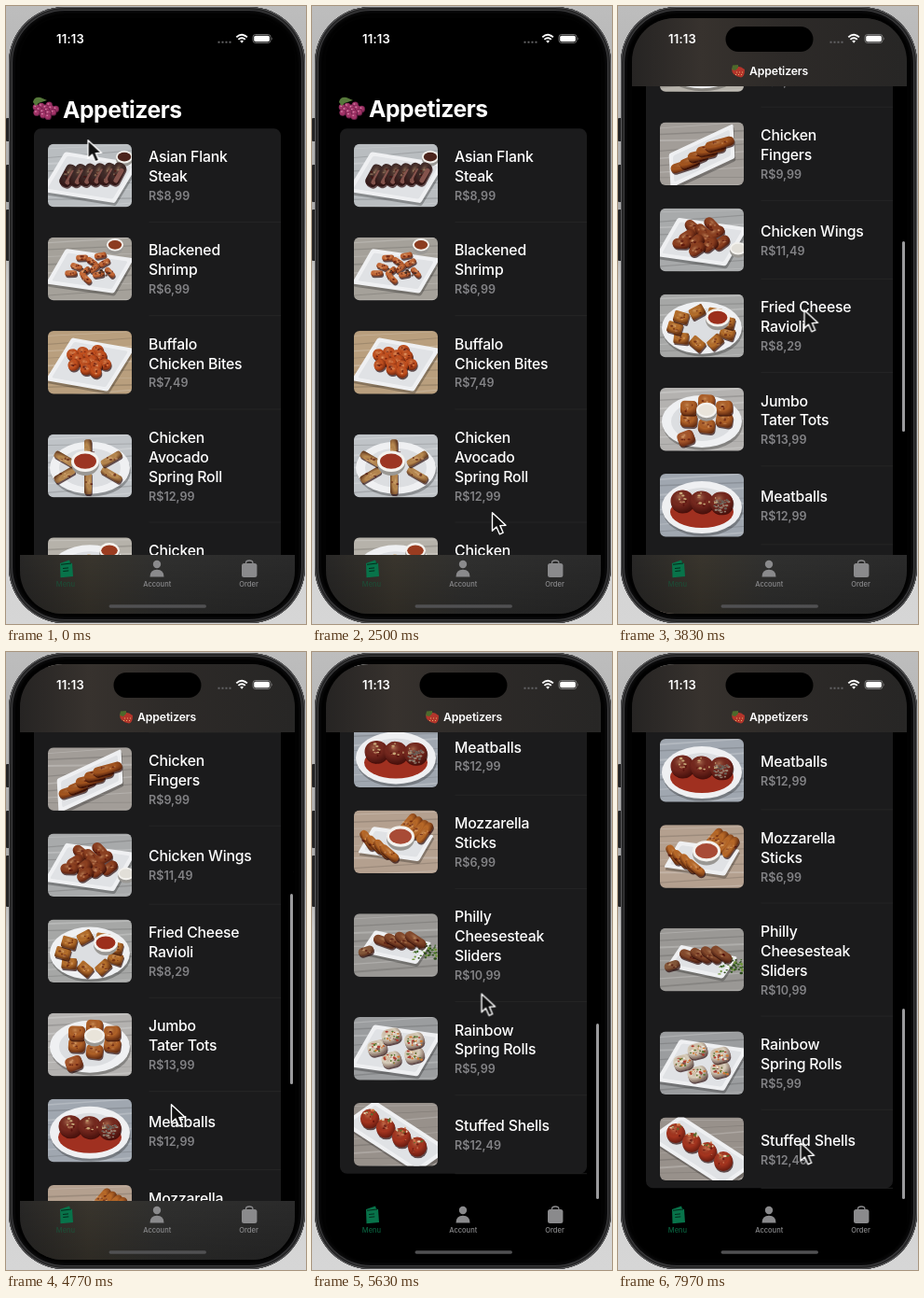
An HTML page that plays this animation: 322 px wide and 662 px high, repeating every 8 s.

```html
<!DOCTYPE html>
<html lang="en">
<head>
<meta charset="utf-8">
<title>Appetizers</title>
<style>
@property --s { syntax: '<number>'; inherits: true; initial-value: 0; }
html, body { margin: 0; width: 100%; height: 100%; overflow: hidden; }
body { position: relative; background: linear-gradient(#bdbdbd, #a9a9a9 35%, #c9c9c9 45%, #d6d6d6); }
svg { position: absolute; left: 0; top: 0; overflow: visible; }
text { font-family: Inter, Roboto, sans-serif; fill: #fff; }
.phone {
  position: absolute; left: 3px; top: 1px; width: 318px; height: 660px; border-radius: 60px;
  background: #020202;
  box-shadow: inset 0 0 0 1px #59595b, inset 0 0 0 3px #252526, inset 0 0 0 4px #3b3b3d, inset 0 0 3px 6px #0d0d0e;
}
.key { position: absolute; left: 0; width: 4px; background: #232324; border-radius: 1px; }
.screen {
  --top: clamp(0, (var(--s) - 30) / 16, 1);
  --end: clamp(0, (953 - var(--s)) / 14, 1);
  --over: max(0, var(--s) - 953);
  position: absolute; left: 0; top: 0; width: 322px; height: 662px; background: #000;
  clip-path: inset(13px 12px 11px 15px round 46px);
  animation: scroll 8s infinite;
}
.list { transform: translateY(calc(var(--s) * -1px)); }
.glass { position: absolute; left: 15px; width: 295px; }
.nav {
  top: 13px; height: 73px; opacity: var(--top);
  background: linear-gradient(90deg, #262423, #37322e 25%, #2d2a28 55%, #272625);
}
.tab {
  top: 588px; height: 64px; opacity: var(--end);
  background: linear-gradient(#0000, #0003), linear-gradient(90deg, #282726, #39352d 25%, #30302f 50%, #2a2a2a);
}
.bar { opacity: var(--top); }
.thumb {
  position: absolute; left: 305px; width: 2.6px; border-radius: 2px; background: #9b9b9d;
  top: calc(78.5px + min(var(--s), 953) * .3185px + var(--over) * 1px);
  height: calc(204px - var(--over) * 1px);
  opacity: clamp(0, var(--s) / 6, 1);
}
.h1 { font-size: 24.7px; font-weight: 700; letter-spacing: -.45px; }
.name { font-size: 15.8px; font-weight: 500; letter-spacing: -.2px; }
.price { font-size: 12.6px; font-weight: 600; fill: #828285; }
.head { font-size: 12.2px; font-weight: 600; letter-spacing: -.1px; }
.time { font-size: 13px; font-weight: 600; letter-spacing: .2px; }
.tabs text { font-size: 7.5px; font-weight: 500; fill: #8a8a8c; text-anchor: middle; }
.tabs .on { fill: #0b7048; opacity: calc(.85 - var(--end) * .4); }
.cursor { animation: point 8s infinite ease-in-out; }
@keyframes scroll {
  0%, 31.25% { --s: 0; animation-timing-function: cubic-bezier(.4, 0, .75, .9); }
  37.875% { --s: 488.6; animation-timing-function: cubic-bezier(.1, .6, .4, 1); }
  41.625%, 47.875% { --s: 545; animation-timing-function: ease-in-out; }
  59.625% { --s: 567.2; animation-timing-function: cubic-bezier(.3, 0, .4, 1); }
  69% { --s: 972; animation-timing-function: ease-in-out; }
  70.375% { --s: 968.6; animation-timing-function: ease-out; }
  76.5%, 80% { --s: 953; animation-timing-function: ease-in-out; }
  87.5%, 90% { --s: 790; animation-timing-function: cubic-bezier(.3, 0, .3, 1); }
  97.5%, 100% { --s: 953; }
}
@keyframes point {
  0%, 2.5% { transform: translate(87.5px, 143px); }
  8.375%, 12.5% { transform: translate(237px, 566px); }
  25.875%, 31.25% { transform: translate(193px, 542px); }
  37.875%, 47.875% { transform: translate(199.5px, 325px); }
  59.625% { transform: translate(177px, 484px); }
  63.5%, 70.375% { transform: translate(181.5px, 365.5px); }
  77.875%, 80% { transform: translate(200px, 434px); }
  88% { transform: translate(198px, 560px); }
  94% { transform: translate(196px, 472px); }
  99.625%, 100% { transform: translate(195.5px, 525px); }
}
</style>
</head>
<body>
<div class="key" style="top:120px;height:25px"></div>
<div class="key" style="top:170px;height:40px"></div>
<div class="key" style="top:218px;height:55px"></div>
<div class="phone"></div>

<div class="screen">
  <svg class="list" id="list" width="322" height="1540"></svg>
  <div class="thumb"></div>
  <div class="glass nav"></div>
  <div class="glass tab"></div>
  <svg width="322" height="662">
    <g class="bar">
      <g transform="translate(121 62)">
        <path d="M1 5Q8 0 15 6Q15 14 11 14.500Q1 13 1 5Z" fill="#b3352b"/>
        <path d="M1 6L2 1.500L8 1L8 4L5 7Z" fill="#4d6a2c"/>
        <path d="M6 9H14M5 11.500H13" stroke="#e3b06a" stroke-dasharray="1 2"/>
      </g>
      <text class="head" x="141" y="74">Appetizers</text>
    </g>
    <rect x="115.500" y="22" width="94" height="27" rx="13.500"/>
    <text class="time" x="54" y="39.500">11:13</text>
    <path d="M227.500 38.800H242" stroke="#626264" stroke-width="2" stroke-dasharray="2 2"/>
    <g fill="none" stroke="#fff" stroke-width="1.900">
      <path d="M247.300 33.400Q253.100 28.300 258.900 33.400M249.400 35.900Q253.100 32.700 256.800 35.900"/>
    </g>
    <path d="M253.100 39.800L251.200 37.500Q253.100 36 255 37.500Z" fill="#fff"/>
    <rect x="265" y="30.500" width="19" height="9" rx="2.800" fill="none" stroke="#8c8c8c" stroke-width=".8"/>
    <rect x="266.200" y="31.700" width="16.600" height="6.600" rx="1.700" fill="#fff"/>
    <path d="M285.200 33.500q1.300 1.500 0 3z" fill="#8c8c8c"/>
    <g class="tabs" fill="#8a8a8c">
      <path d="M58 597L68 593.500L69 596.500L71 597L72 611L58.500 612.300Z" fill="#08734a"/>
      <path d="M59 598.300L70 597M61 602.500l6-.6M61.300 605.500l6-.6" stroke="#032a1b"/>
      <circle cx="162" cy="598" r="4.200"/>
      <path d="M154.500 611.600Q154.500 603.800 162 603.800T169.500 611.600Z"/>
      <rect x="253" y="597" width="16.400" height="15" rx="2.500"/>
      <path d="M257.500 599V596.500Q257.500 594 261.200 594T264.900 596.500V599" fill="none" stroke="#8a8a8c" stroke-width="1.300"/>
      <text class="on" x="64" y="622">Menu</text>
      <text x="162.200" y="622">Account</text>
      <text x="260.600" y="622">Order</text>
    </g>
    <rect x="110.500" y="641.300" width="104.500" height="3.500" rx="1.750" fill="#505052"/>
  </svg>
</div>

<svg class="cursor" width="18" height="26">
  <path d="M.5 .8V20.200L5 16L8.400 23.800L12.200 22.200L8.900 14.600L15 14.300Z" fill="#111" stroke="#fff" stroke-width="1.400" stroke-linejoin="round"/>
</svg>

<script>
let seed = 11;
const rnd = (a, b) => {
  seed = (seed * 16807) % 2147483647;
  return +(a + (b - a) * seed / 2147483647).toFixed(2);
};
const times = (n, f) => Array.from({ length: n }, (_, i) => f(i)).join('');

// Shapes, all placed by their centre in a 90 x 67.5 picture.
const disc = (x, y, rx, ry, c) => `<ellipse cx="${x}" cy="${y}" rx="${rx}" ry="${ry}" fill="${c}"/>`;
const box = (x, y, w, h, c, a = 0, r = 1, skew = 0) =>
  `<rect x="${-w / 2}" y="${-h / 2}" width="${w}" height="${h}" rx="${r}" fill="${c}" transform="translate(${x} ${y}) rotate(${a}) skewX(${skew})"/>`;
const table = c => box(45, 34, 90, 68, c, 0, 0) +
  times(9, i => box(45, i * 8 + 3, 95, rnd(.6, 2), i % 2 ? '#0002' : '#fff3', rnd(-5, 0)));
const round = () => disc(46, 39, 43, 28, '#0004') + disc(45, 36, 43, 28, '#eff0f2') + disc(45, 36, 33, 21, '#dcdee1');
const slab = (w, h, a) => box(46, 39, w, h, '#0004', a, 2, -22) + box(45, 36, w, h, '#eff0f2', a, 2, -22) +
  box(45, 36, w - 9, h - 8, '#e0e2e5', a, 2, -22);
const bowl = (x, y, r, c) => disc(x, y + 2.5, r, r * .85, '#9a9894') + disc(x, y, r, r * .75, '#f4f2ee') +
  disc(x, y, r * .8, r * .54, c);
const specks = (n, x, y, w, h, colors) => times(n, i =>
  disc(x + rnd(-w, w), y + rnd(-h, h), rnd(.6, 1.9), rnd(.5, 1.3), colors[i % colors.length]));
const leaves = (x, y, r) => specks(60, x, y, r, r * .7, ['#3c6a22', '#6f9638', '#2b4a1b']);

// One piece of food: shadow, colour, shading and browned specks.
const bit = (x, y, w, h, a, c, k = .5) => {
  const r = Math.min(w, h) * k;
  return box(x + .8, y + 1.8, w, h, '#200a', a, r) + box(x, y, w, h, c, a, r) + box(x, y, w, h, 'url(#shade)', a, r) +
    specks(5, x, y, w * .25, h * .25, ['#4008', '#fc95']);
};

// Arrangements: a pile, a ring and a row.
const pile = (n, x, y, r, f) => Array.from({ length: n }, (_, i) => {
  const d = r * Math.sqrt((i + .3) / n), a = i * 2.4;
  return [x + d * Math.cos(a), y + d * .62 * Math.sin(a)];
}).sort((p, q) => p[1] - q[1]).map(p => f(...p)).join('');
const ring = (n, x, y, r, f) => times(n, i => {
  const a = (i + .5) / n * 2 * Math.PI;
  return f(x + r * Math.cos(a), y + r * .6 * Math.sin(a), a * 180 / Math.PI);
});
const row = (n, x1, y1, x2, y2, f) => times(n, i => f(x1 + (x2 - x1) * i / (n - 1), y1 + (y2 - y1) * i / (n - 1)));
const pieces = (w, h, a, c, k) => (x, y) => bit(x, y, w, h, a + rnd(-9, 9), c, k);
const tossed = (w, h, c, k) => (x, y) => bit(x, y, w, h, rnd(-50, 50), c, k);

const wrap = (x, y) => bit(x, y, 21, 16, -14, '#d9d0bd', .4) + specks(20, x, y, 8, 5, ['#b03d30', '#53752f', '#d07a34', '#efe8da']);
const shell = (x, y) => bit(x, y, 20, 21, 0, '#a5351f') + specks(9, x, y - 7, 6, 3, ['#e5d3b0', '#cc7040', '#5b6a2c']);

const menu = [
  ['Asian Flank|Steak', '8,99', () => table('#b9bdc0') + slab(80, 46, 9) + bowl(82, 14, 9, '#4c241c') +
    row(6, 22, 34, 74, 32, (x, y) => bit(x, y, 13, 25, 28, '#3d2a28', .4) + box(x + 2, y + 2, 5, 17, '#84534c', 30, 2))],
  ['Blackened|Shrimp', '6,99', () => table('#a5a19a') + bowl(72, 8, 9, '#8c3c20') + slab(74, 40, 8) +
    pile(11, 46, 33, 25, tossed(13, 6, '#c96c38')) + specks(12, 52, 33, 18, 9, ['#452a20'])],
  ['Buffalo|Chicken Bites', '7,49', () => table('#b99f7e') + slab(68, 50, 10) + pile(13, 45, 32, 22, tossed(13, 12, '#c4511f'))],
  ['Chicken|Avocado|Spring Roll', '12,99', () => table('#bfc3c7') + round() +
    ring(6, 43, 35, 29, (x, y, a) => bit(x, y, 24, 8, a, '#b88a50', .35)) + bowl(40, 29, 15, '#9c3522')],
  ['Chicken|Dumplings', '8,99', () => table('#b6b2aa') + round() + leaves(17, 40, 15) + bowl(66, 14, 11, '#9a3c20') +
    pile(7, 47, 36, 26, tossed(22, 12, '#cda266'))],
  ['Chicken|Fingers', '9,99', () => table('#a29d98') + slab(76, 34, -25) + row(5, 27, 46, 64, 23, pieces(32, 10, -18, '#a4561f'))],
  ['Chicken Wings', '11,49', () => table('#a8aaab') + slab(76, 44, 8) + bowl(84, 43, 9, '#e2dfd8') + pile(11, 45, 32, 26, tossed(19, 11, '#8c4020'))],
  ['Fried Cheese|Ravioli', '8,29', () => table('#a6a7a6') + round() + ring(9, 45, 36, 29, tossed(16, 12, '#b6702b', .15)) + bowl(62, 25, 13, '#9c2f1c')],
  ['Jumbo|Tater Tots', '13,99', () => table('#b4b2b0') + round() + ring(6, 50, 28, 22, pieces(18, 15, 0, '#b06228', .3)) +
    bowl(50, 24, 11, '#e9e4da') + bit(28, 54, 18, 15, -20, '#a6562a', .3)],
  ['Meatballs', '12,99', () => table('#a0a7b0') + round() + disc(45, 41, 34, 17, '#a03020') +
    row(3, 24, 29, 66, 31, pieces(25, 23, 0, '#74281e')) + specks(40, 66, 35, 8, 7, ['#695e56', '#978071']) + specks(14, 40, 26, 22, 7, ['#c8a878'])],
  ['Mozzarella|Sticks', '6,99', () => table('#b4a08f') + slab(66, 30, 8) + row(4, 15, 32, 38, 46, pieces(24, 9, 48, '#b96a28')) +
    row(4, 58, 14, 76, 24, pieces(25, 9, -48, '#b96a28')) + bowl(50, 28, 15, '#a84b36')],
  ['Philly|Cheesesteak|Sliders', '10,99', () => table('#9a9895') + slab(62, 26, 12) + leaves(76, 40, 13) +
    row(4, 33, 30, 66, 28, pieces(25, 10, 26, '#844a2c')) + bit(13, 40, 17, 9, -18, '#84583a')],
  ['Rainbow|Spring Rolls', '5,99', () => table('#9b9d9f') + slab(74, 48, 8) + ring(5, 47, 33, 22, wrap)],
  ['Stuffed Shells', '12,49', () => table('#98918b') + slab(96, 40, 33) + row(4, 17, 17, 68, 47, shell)]
];

const label = (cls, x, y, s) => `<text class="${cls}" x="${x}" y="${y.toFixed(2)}">${s}</text>`;
const start = 131.3, line = 20.9;
let y = start;
const rows = menu.map(([name, price, art]) => {
  const lines = name.split('|'), h = Math.max(84, 58.4 + line * lines.length);
  const mid = y + h / 2, half = line / 2 * (lines.length - 1);
  y += h;
  return `<path d="M153.500 ${y}H295" stroke="#272728" stroke-width=".8"/>` +
    `<g transform="translate(45 ${mid - 33.75})" clip-path="url(#pic)">${art()}</g>` +
    lines.map((s, n) => label('name', 153, mid - 3.7 - half + line * n, s)).join('') +
    label('price', 153, mid + 16.2 + half, 'R$' + price);
}).join('');

const grapes = pile(14, 42, 112, 12, (x, y) =>
  disc(x, y, 3.6, 3.6, '#6b1f48') + disc(x - .3, y - .4, 2.9, 2.9, '#a23468') + disc(x - 1, y - 1.2, 1, .8, '#d583a8'));

document.getElementById('list').innerHTML =
  `<clipPath id="pic"><rect width="90" height="67.5" rx="6"/></clipPath>
  <radialGradient id="shade" cx=".4" cy=".3" r=".75">
    <stop stop-color="#ffd9a0" stop-opacity=".35"/><stop offset=".5" stop-color="#300" stop-opacity="0"/>
    <stop offset="1" stop-color="#200" stop-opacity=".55"/>
  </radialGradient>
  ${grapes}<path d="M29 103Q30 97 37 98L44 101L35 104L32 107Z" fill="#56783a"/>
  ${label('h1', 61, 119.5, 'Appetizers')}
  <rect x="30" y="${start}" width="265" height="${y - start}" rx="7.5" fill="#1b1b1c"/>${rows}`;
</script>
</body>
</html>
```
